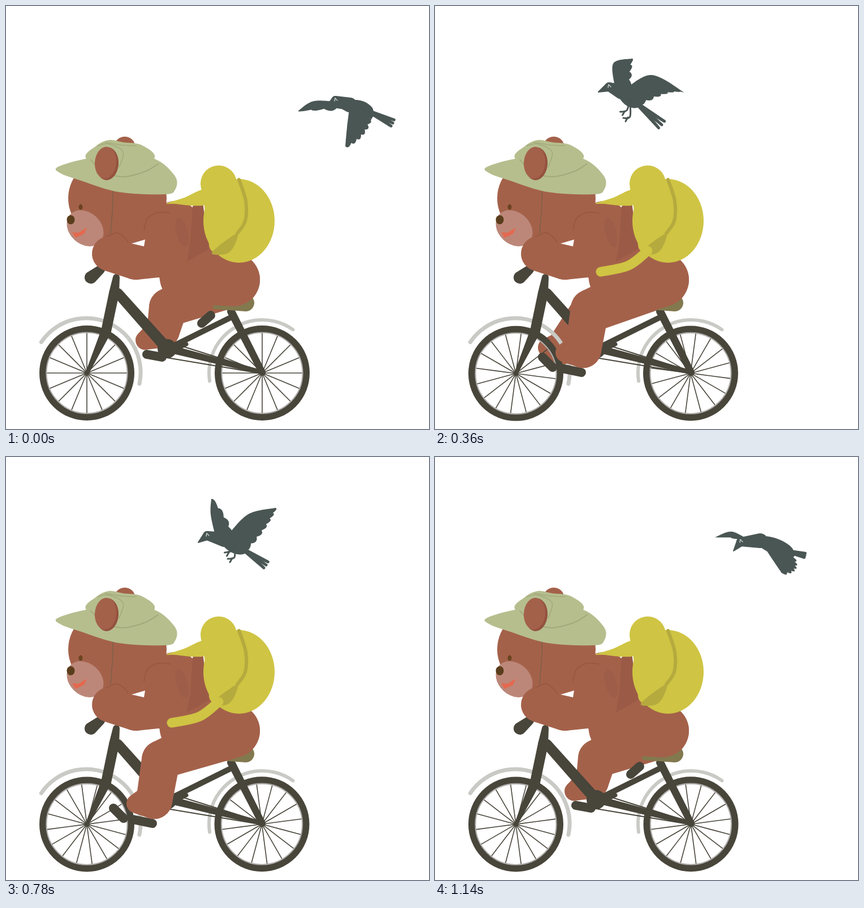
Animation, 748 px wide and 748 px high, one loop 1.2 s. Source, as an HTML page with a canvas:

```html
<!DOCTYPE html>
<html lang="en">
<head>
<meta charset="utf-8">
<title>Bear on a bicycle</title>
<style>
html, body { margin: 0; width: 100%; height: 100%; overflow: hidden; background: #fff; }
canvas { display: block; width: 100vw; height: 100vh; }
</style>
</head>
<body>
<canvas id="stage" width="748" height="748"></canvas>
<script>
const ctx = document.getElementById('stage').getContext('2d');
const STEP = 60, COUNT = 20;
const FUR = '#a4614a', FUR_DARK = '#99583f', IRON = '#48453a', CROW = '#4a5653';
const FENDER = '#c9cac5', YELLOW = '#cfc443', OLIVE = '#b5aa3e', HAT = '#b6be8e', HAT_DARK = '#a2aa7b';

const nums = s => s.split(' ').map(Number);
const mix = (a, b, f) => a.map((v, i) => v + (b[i] - v) * f);
const mid = (a, b) => mix(a, b, 0.5);

// Smooth path through all points
function curve(p, closed) {
  const n = p.length / 2;
  const at = i => {
    const k = closed ? (i + n) % n : Math.max(0, Math.min(n - 1, i));
    return [p[2 * k], p[2 * k + 1]];
  };
  ctx.beginPath();
  ctx.moveTo(p[0], p[1]);
  for (let i = 0; i < (closed ? n : n - 1); i++) {
    const [a, b, c, d] = [at(i - 1), at(i), at(i + 1), at(i + 2)];
    ctx.bezierCurveTo(b[0] + (c[0] - a[0]) / 6, b[1] + (c[1] - a[1]) / 6,
      c[0] - (d[0] - b[0]) / 6, c[1] - (d[1] - b[1]) / 6, c[0], c[1]);
  }
}
function blob(color, s) {
  curve(nums(s), true);
  ctx.fillStyle = color;
  ctx.fill();
}
function line(color, width, p) {
  curve(p, false);
  ctx.strokeStyle = color;
  ctx.lineWidth = width;
  ctx.stroke();
}
function poly(color, ...points) {
  ctx.beginPath();
  points.forEach(p => ctx.lineTo(...p));
  ctx.fillStyle = color;
  ctx.fill();
}
function oval(color, x, y, rx, ry = rx, turn = 0) {
  ctx.beginPath();
  ctx.ellipse(x, y, rx, ry, turn, 0, 7);
  ctx.fillStyle = color;
  ctx.fill();
}
function arc(color, width, x, y, r, from = 0, to = 7) {
  ctx.beginPath();
  ctx.arc(x, y, r, from, to);
  ctx.strokeStyle = color;
  ctx.lineWidth = width;
  ctx.stroke();
}
// Chain of circles (x, y, r), each joined to the next by its tangents
function limb(color, ...c) {
  ctx.fillStyle = color;
  for (let i = 0; i + 5 < c.length; i += 3) {
    const [x, y, r, x2, y2, r2] = c.slice(i, i + 6);
    const a = Math.atan2(y2 - y, x2 - x), d = Math.hypot(x2 - x, y2 - y);
    const off = Math.acos(Math.max(-1, Math.min(1, (r - r2) / d)));
    ctx.beginPath();
    ctx.arc(x, y, r, a + off, a - off + 2 * Math.PI);
    ctx.arc(x2, y2, r2, a - off, a + off);
    ctx.fill();
  }
}

// Keys are times in steps. Pedalling runs forward and then back.
// near, far: knee, ankle, toe. pedals: two segments.
const pedalKeys = [
  { at: 0, near: [288, 525, 284, 575, 253, 590], far: [287, 533, 278, 575, 246, 591], pedals: [346, 561, 362, 547, 249, 616, 276, 621] },
  { at: 4, near: [284, 518, 287, 578, 254, 593], far: [300, 550, 250, 611, 210, 600], pedals: [265, 615, 296, 619, 204, 619, 227, 636] },
  { at: 6, near: [274, 535, 262, 608, 230, 613], far: [270, 545, 225, 605, 199, 604], pedals: [225, 641, 259, 648, 190, 621, 208, 639] },
  { at: 9, near: [292, 550, 239, 619, 207, 608], far: [270, 545, 225, 605, 199, 604], pedals: [226, 640, 250, 646, 208, 638, 218, 645] }
];
// beak, head, chest, rump, tail, near elbow and tip, far elbow and tip, foot
const crowKeys = [
  [0, '564 181 583 167 608 175 645 188 684 207 603 215 600 248 545 168 516 186 640 195'],
  [4, '438 63 458 55 478 68 490 115 518 154 450 64 430 80 474 47 496 45 480 132'],
  [6, '289 152 308 143 330 152 359 174 401 210 382 122 441 153 315 102 348 93 333 198'],
  [10, '205 199 226 191 251 203 276 228 311 268 305 178 361 175 232 148 235 121 232 246'],
  [13, '340 151 356 139 386 146 422 165 460 191 427 102 476 90 362 102 363 74 392 180'],
  [15, '393 139 407 122 433 122 473 136 520 153 488 105 544 122 405 88 369 98 443 150'],
  [19, '528 166 541 150 575 148 628 168 654 174 598 183 613 205 525 132 495 142 620 172']
].map(([at, s]) => ({ at, joints: nums(s) }));
crowKeys.push({ ...crowKeys[0], at: COUNT });

// Value of one property between the keys around time t
function sample(keys, t, prop) {
  const i = Math.max(1, keys.findIndex(k => k.at >= t));
  const a = keys[i - 1], b = keys[i];
  return mix(a[prop], b[prop], (t - a.at) / (b.at - a.at));
}

function leg([kx, ky, ax, ay, tx, ty], ankle) {
  limb(FUR, 402, 486, 46, kx, ky, 34, ax, ay, ankle, tx, ty, 17);
}

function wheel(x, y, turn) {
  for (let i = 0; i < 16; i++) {
    const a = turn + i * Math.PI / 8;
    line(IRON, 1.6, [x, y, x + 71 * Math.cos(a), y + 71 * Math.sin(a)]);
  }
  arc('#b0aeac', 4, x, y, 72.5);
  arc(IRON, 11.4, x, y, 78.3);
  oval(IRON, x, y, 4);
}

function bike(pedals) {
  arc(FENDER, 7, 142, 648, 96, -2.55, 0.21);
  arc(FENDER, 6, 453, 649, 94, 2.99, 5.33);
  line(IRON, 2, [300, 598, 453, 646]);
  line(IRON, 2, [285, 622, 453, 650]);
  line(IRON, 10, [290, 604, 401, 549]);
  line(IRON, 7, [300, 607, 319, 598]);
  limb(IRON, 292, 607, 7, 454, 648, 4);
  limb(IRON, 398, 540, 7, 453, 648, 6);
  limb(IRON, 150, 480, 11, 167, 466, 8);
  limb(IRON, 195, 480, 6, 191, 508, 9, 177, 575, 9, 143, 650, 3);
  limb(IRON, 198, 508, 9, 285, 606, 10);
  oval(IRON, 285, 606, 17);
  line(IRON, 16, pedals.slice(0, 4));
  line(IRON, 16, pedals.slice(4));
}

function pack() {
  blob(YELLOW, '284 349 315 339 350 325 352 350 330 353 300 350');
  oval(YELLOW, 412, 380, 63, 74);
  limb(YELLOW, 376, 314, 32, 392, 386, 35, 374, 422, 15);
  line(OLIVE, 6, [412, 307, 424, 345, 423, 380, 409, 402]);
  blob(OLIVE, '364 436 407 403 404 423 390 438');
}

function head() {
  oval(FUR, 197, 340, 87, 78);
  line('#7d6048', 1.5, [189, 326, 189, 350, 185, 402]);
  oval('#bc8779', 140, 393, 36, 28, 0.75);
  oval('#5a3d1c', 114.5, 378, 7, 8);
  oval('#6b4420', 132, 355.5, 3.5, 5);
  poly('#e4694f', [117, 400], [128, 401], [143, 392], [138, 403], [123, 410]);
  oval(FUR, 210, 247, 18, 16);
  blob(HAT, '142 270 160 247 182 237 207 241 240 246 262 270 200 300');
  blob(HAT, '91 285 142 270 200 265 262 270 299 301 299 325 280 333 200 329 130 308 97 296');
  line(HAT_DARK, 2, [150, 272, 170, 291, 205, 302, 245, 293, 269, 279]);
  line(HAT_DARK, 1.5, [162, 247, 182, 244, 207, 258, 200, 285]);
  line(HAT_DARK, 1.5, [175, 241, 205, 246, 230, 247]);
  oval('#94523f', 179, 279, 20, 29, 0.08);
  oval(FUR, 176, 277, 19, 28, 0.08);
}

function arm() {
  limb(FUR, 183, 438, 31, 230, 448, 36, 268, 440, 40, 286, 402, 35);
  line(FUR_DARK, 2, [178, 408, 196, 401, 209, 409, 216, 418]);
  line(FUR_DARK, 2, [244, 397, 250, 376, 268, 365, 290, 366]);
  oval('#9e5d48', 311, 400, 10, 27, -0.25);
  poly('#fff', [222, 420], [246, 413], [244, 425]);
}

// Wing: curved leading edge, then feathers along the way back to the body
function wing(root, end, elbow, tip, feathers) {
  const bend = end.map((v, i) => v + elbow[i] - root[i]);
  const edge = f => mix(mix(tip, bend, f), mix(bend, end, f), f);
  curve([...root, ...elbow, ...tip], false);
  for (let i = 1; i <= feathers; i++) {
    const m = edge((i - 0.5) / feathers);
    const out = m.map((v, k) => v - mid(root, elbow)[k]);
    const far = 9 / Math.hypot(...out);
    ctx.quadraticCurveTo(m[0] + out[0] * far, m[1] + out[1] * far, ...edge(i / feathers));
  }
  ctx.fillStyle = CROW;
  ctx.fill();
}

function crow(joints) {
  const [beak, face, chest, rump, tail, elbow, tip, farElbow, farTip, foot] =
    joints.map((v, i) => [v, joints[i + 1]]).filter((_, i) => i % 2 === 0);
  const belly = mid(chest, rump);
  const slope = Math.atan2(rump[1] - chest[1], rump[0] - chest[0]);
  const spread = Math.atan2(tail[1] - rump[1], tail[0] - rump[0]);
  const reach = Math.hypot(tail[0] - rump[0], tail[1] - rump[1]);

  wing(mid(face, chest), belly, farElbow, farTip, 5);
  wing(chest, rump, elbow, tip, 7);
  limb(CROW, ...beak, 1, ...face, 8, ...chest, 13);
  oval(CROW, ...belly, Math.hypot(rump[0] - chest[0], rump[1] - chest[1]) * 0.62, 14, slope);
  for (const a of [-0.14, 0, 0.14]) {
    limb(CROW, ...rump, 4, rump[0] + reach * Math.cos(spread + a), rump[1] + reach * Math.sin(spread + a), 2.5);
  }
  for (const lift of [0, 11]) {
    const [x, y] = [foot[0] - lift / 2, foot[1] - lift];
    line(CROW, 3, [...belly, x + 12, y - 3, x, y]);
    line(CROW, 3, [x + 8, y - 1, x + 4, y + 6]);
  }
  const [x, y] = face;
  line('#c5cccb', 1.5, [x - 2, y + 1, x - 1, y - 4]);
  line('#c5cccb', 1.5, [x - 1, y - 4, x + 3, y]);
}

function draw(n) {
  const push = Math.min(n, COUNT - 1 - n);
  const nearShown = push > 1;
  const roll = 1 - Math.cos(n * Math.PI / 2);
  const turn = -roll * Math.PI / 24;

  ctx.clearRect(0, 0, 748, 748);
  ctx.lineCap = ctx.lineJoin = 'round';
  if (n < 8 || n > 16) leg(sample(pedalKeys, push, 'far'), 29);
  wheel(143, 649 + roll * 0.4, turn);
  wheel(453 - roll / 2, 649 + roll * 0.2, turn);
  bike(sample(pedalKeys, push, 'pedals'));
  limb('#82794f', 424, 525, 15, 370, 532, 4);
  limb(FUR, 300, 390, 45, 318, 480, 46, 402, 484, 47, 300, 390, 45);
  if (nearShown) leg(sample(pedalKeys, push, 'near'), 32);
  poly('#9b5a46', [330, 354], [348, 347], [359, 430], [320, 452], [326, 415]);
  pack();
  head();
  arm();
  if (nearShown) line(YELLOW, 17, [293, 470, 342, 459, 376, 433]);
  crow(sample(crowKeys, n, 'joints'));
}

function tick(now) {
  draw(Math.floor(now / STEP) % COUNT);
  requestAnimationFrame(tick);
}
draw(0);
requestAnimationFrame(tick);
</script>
</body>
</html>
```
